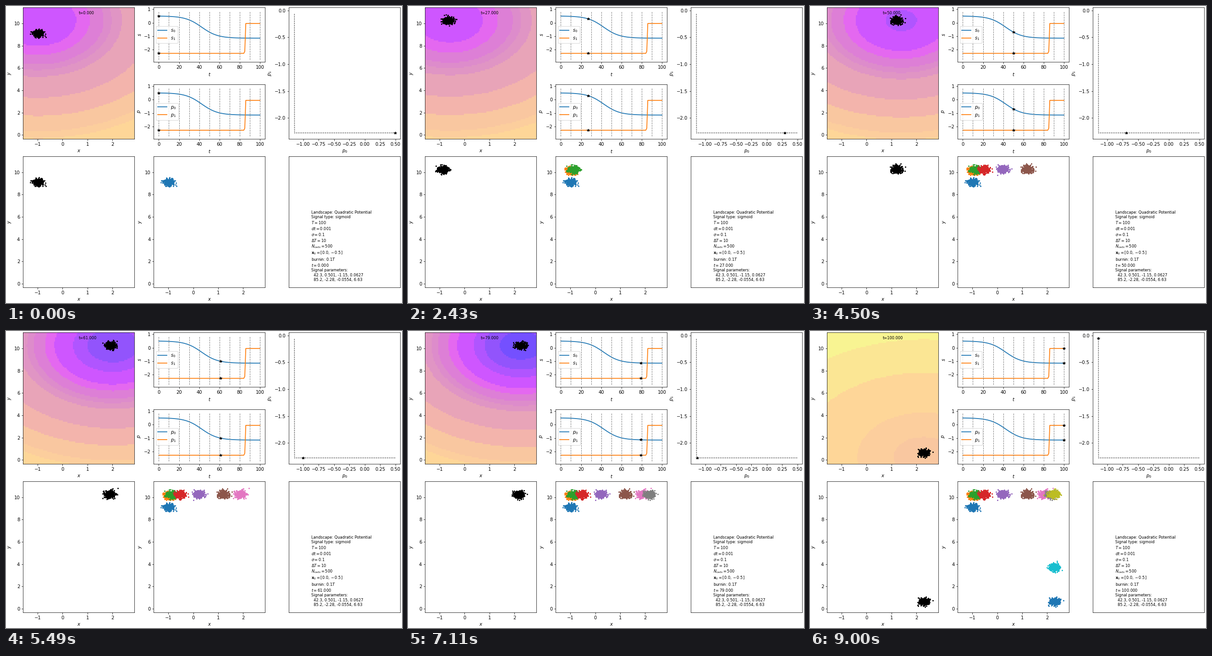
A matplotlib script that plays this animation: 864 by 648 pixels, repeating every 9090 ms.

```python
import numpy as np
import matplotlib.pyplot as plt
from matplotlib.animation import FuncAnimation

W, H, DPI = 864, 648, 72
T_END, GAP, CELLS = 100, 10, 500
XLIM, YLIM = (-1.583, 2.879), (-0.354, 11.424)
SIGMA = 0.1
RATE = np.array([1 / 2, 2 / 9])

# Potential levels and the colours of the bands between them
LEVELS = [-12.8, -12.45, -12.08, -11.35, -10.86, -10.2, -9.75, -9.1,
          -6.6, -3.8, -0.96, 0.45, 5.05, 11.0]
BANDS = np.array([
    (116, 80, 255), (146, 84, 252), (176, 85, 255), (206, 86, 255),
    (228, 104, 240), (221, 127, 214), (221, 140, 203), (224, 149, 196),
    (232, 164, 184), (243, 180, 172), (249, 199, 160), (252, 206, 157),
    (254, 214, 152), (251, 230, 148), (248, 244, 146)], dtype=np.uint8)


def sigmoid(t, mid, start, end, rate):
    return start + (end - start) * 0.5 * (1 + np.tanh(rate * (t - mid)))


def params(t):
    return np.array([sigmoid(t, 42.3, 0.501, -1.15, 0.0627),
                     sigmoid(t, 85.2, -2.28, -0.0554, 6.63)])


def simulate(dt=0.02):
    """Cell positions at every whole time unit, after a burn-in."""
    rng = np.random.default_rng(4)
    cells = np.tile([0.0, -0.5], (CELLS, 1))
    per_unit = round(1 / dt)
    shots = []
    for step in range(-GAP * per_unit, T_END * per_unit + 1):
        if step >= 0 and step % per_unit == 0:
            shots.append(cells.copy())
        drift = -(RATE * cells + params(max(step, 0) * dt))
        cells = cells + drift * dt + SIGMA * np.sqrt(dt) * rng.normal(size=cells.shape)
    return shots


def grid_line(lim, n=100):
    edges = np.linspace(*lim, n + 1)
    return (edges[1:] + edges[:-1]) / 2


GX, GY = np.meshgrid(grid_line(XLIM), grid_line(YLIM))


def landscape(t):
    p0, p1 = params(t)
    v = RATE[0] / 2 * GX**2 + RATE[1] / 2 * GY**2 + p0 * GX + p1 * GY
    return BANDS[np.digitize(v, LEVELS)]


fig = plt.figure(figsize=(W / DPI, H / DPI), dpi=DPI, facecolor="white")


def panel(left, top, height, xlabel="", ylabel=""):
    ax = fig.add_axes([left / W, 1 - (top + height) / H, 242.7 / W, height / H])
    ax.set_xlabel(xlabel)
    ax.set_ylabel(ylabel)
    return ax


def plane(left, top):
    ax = panel(left, top, 286.4, "$x$", "$y$")
    ax.set(xlim=XLIM, ylim=YLIM, xticks=[-1, 0, 1, 2], yticks=range(0, 11, 2))
    return ax


def dots(ax, color):
    return ax.plot([], [], "o", ms=3, mew=0, color=color, zorder=3)[0]


def star(ax):
    return ax.plot([], [], "k*", ms=6, ls="none", zorder=4)[0]


times = np.arange(T_END + 1)
curves = params(times)
shots = simulate()


def signal_panel(top, name):
    ax = panel(322.4, top, 118.7, "$t$", f"${name}$")
    for i, curve in enumerate(curves):
        ax.plot(times, curve, lw=1.8, label=f"${name}_{i}$")
    ax.vlines(np.arange(0, T_END + 1, GAP), -2.73, 0.88,
              colors="gray", linestyles="--", lw=1)
    ax.set(xlim=(-5, 105), ylim=(-2.92, 1.13),
           xticks=range(0, 101, 20), yticks=[-2, -1, 0, 1])
    ax.legend(loc="center left")
    return star(ax)


LEFT, MID, RIGHT = 37.3, 322.4, 617.4
TOP, LOW = 3.4, 328.0

# Landscape with the live cells
land_ax = plane(LEFT, TOP)
land = land_ax.imshow(landscape(0), extent=(*XLIM, *YLIM), origin="lower",
                      aspect="auto", interpolation="nearest")
live = dots(land_ax, "k")
clock = land_ax.text(0.5, 0.95, "", transform=land_ax.transAxes, fontsize="small")

# Latest snapshot, and all snapshots so far
latest = dots(plane(LEFT, LOW), "k")
history_ax = plane(MID, LOW)
history = [dots(history_ax, f"C{k % 10}") for k in range(T_END // GAP + 1)]

signal_stars = [signal_panel(TOP, "s"), signal_panel(171.1, "p")]

# Path through parameter space
path_ax = panel(RIGHT, TOP, 286.4, "$p_0$", "$p_1$")
path_ax.plot(*curves, "k:", lw=1.5)
path_ax.set(xlim=(-1.232, 0.576), ylim=(-2.391, 0.056),
            xticks=np.arange(-1, 0.51, 0.25), yticks=np.arange(-2, 0.1, 0.5))
path_star = star(path_ax)

info_ax = panel(RIGHT, LOW, 286.4)
info_ax.set(xticks=[], yticks=[])
info = info_ax.text(0.2, 0.05, "", transform=info_ax.transAxes, fontsize="small")


def info_text(t):
    return "\n".join([
        "Landscape: Quadratic Potential",
        "Signal type: sigmoid",
        "$T = 100$",
        "$dt = 0.001$",
        r"$\sigma = 0.1$",
        r"$\Delta T = 10$",
        "$N_{cells} = 500$",
        r"$\mathbf{x}_0 = [0.0, -0.5]$",
        "burnin: $0.1T$",
        f"$t = {t:.3f}$",
        "Signal parameters:",
        "  42.3, 0.501, -1.15, 0.0627",
        "  85.2, -2.28, -0.0554, 6.63",
    ])


def update(t):
    land.set_data(landscape(t))
    live.set_data(*shots[t].T)
    clock.set_text(f"t={t:.3f}")
    latest.set_data(*shots[t - t % GAP].T)
    for k, group in enumerate(history):
        group.set_data(*(shots[k * GAP].T if k * GAP <= t else ([], [])))
    now = curves[:, t]
    for mark in signal_stars:
        mark.set_data([t, t], now)
    path_star.set_data(now[:1], now[1:])
    info.set_text(info_text(t))
    return []


anim = FuncAnimation(fig, update, frames=T_END + 1, interval=90,
                     repeat=True, repeat_delay=0, init_func=lambda: update(0))
plt.show()
```
